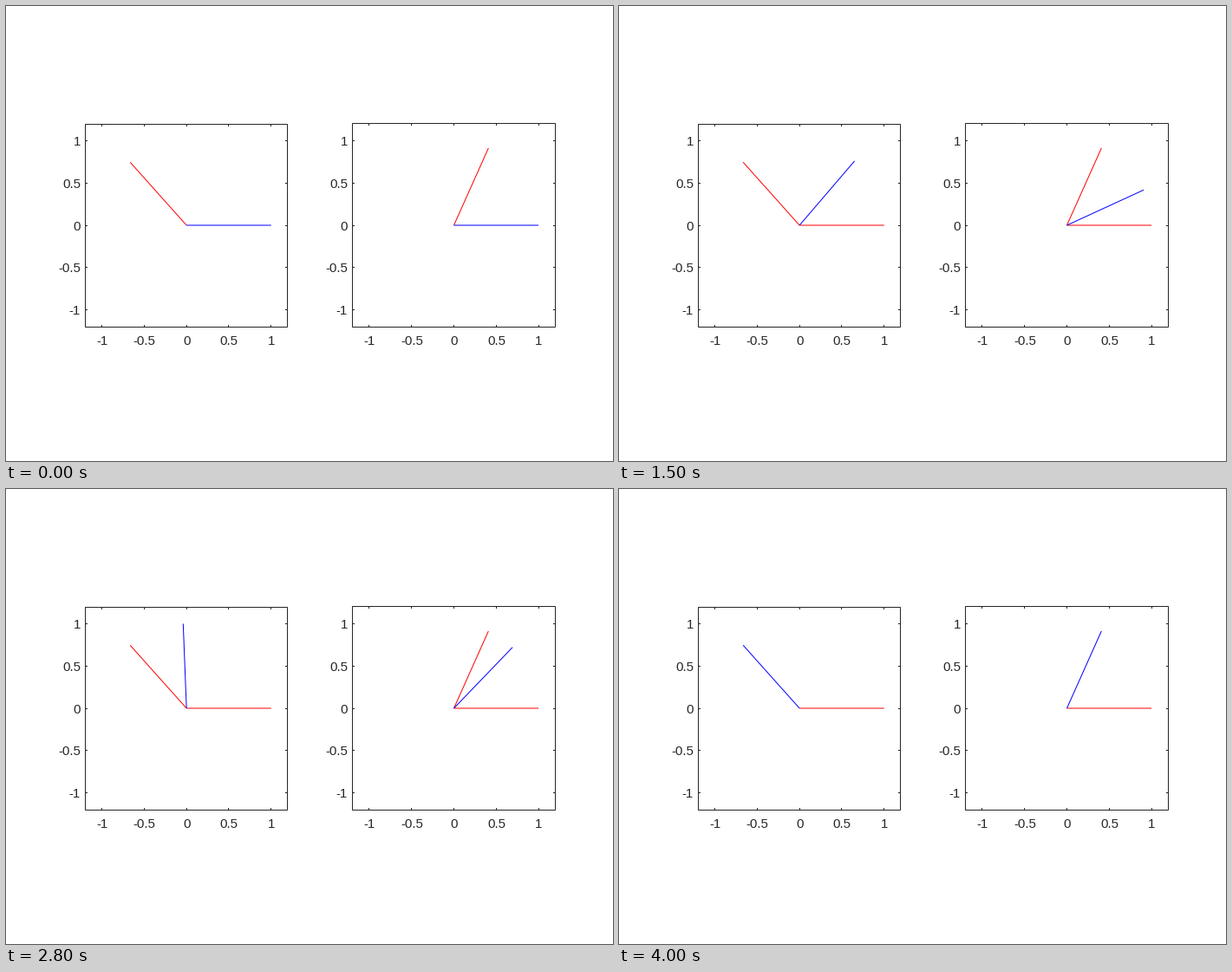
A matplotlib script that plays this animation: 700x525 px, repeating every 4100 ms.

```python
import numpy as np
import matplotlib.pyplot as plt
from matplotlib.animation import FuncAnimation
from matplotlib.patches import Rectangle

W, H, DPI = 700, 525, 100
STEPS = 40
UNIT = 97.6          # pixels per data unit
ORIGIN_Y = 253.0
INK = "#262626"
PX = 72 / DPI        # one pixel in points
TICKS = (-1, -0.5, 0, 0.5, 1)

plt.rcParams["font.family"] = "Liberation Sans"
plt.rcParams["axes.unicode_minus"] = False

fig = plt.figure(figsize=(W / DPI, H / DPI), dpi=DPI, facecolor="white")
ax = fig.add_axes([0, 0, 1, 1])
ax.set_xlim(0, W)
ax.set_ylim(H, 0)
ax.axis("off")


def stroke(xs, ys, color, snap=False):
    line, = ax.plot(xs, ys, color=color, lw=PX, solid_capstyle="butt", snap=snap)
    return line


def label(x, y, value, ha):
    ax.text(x, y, f"{value:g}", ha=ha, va="baseline", size=15 * PX, color=INK)


def pixel(v):
    return np.floor(v) + 0.5


def draw_frame(left, right, top, bottom, ox):
    ax.add_patch(Rectangle((left, top), right - left, bottom - top, fill=False,
                           ec=INK, lw=PX, joinstyle="miter", snap=False))
    for t in TICKS:
        x, y = ox + t * UNIT, ORIGIN_Y - t * UNIT
        px, py = pixel(x), pixel(y)
        for edge, d in ((top, 2.5), (bottom, -2.5)):
            stroke([px, px], [edge, edge + d], INK)
        for edge, d in ((left, 2.5), (right, -2.5)):
            stroke([edge, edge + d], [py, py], INK)
        label(x + 0.4, 391, t, "center")
        label(left - 5.5, y + 5.6, t, "right")


class Panel:
    """A unit vector turning from angle 0 to a goal angle."""

    def __init__(self, box, ox, goal):
        draw_frame(*box, ox)
        self.ox, self.goal = ox, goal
        self.start = stroke(*self.ray(0), "red")
        self.end = stroke(*self.ray(goal), "red")
        self.hand = stroke(*self.ray(0), "blue")

    def ray(self, angle):
        return ([self.ox, self.ox + UNIT * np.cos(angle)],
                [ORIGIN_Y, ORIGIN_Y - UNIT * np.sin(angle)])

    def update(self, i):
        self.hand.set_data(*self.ray(self.goal * i / STEPS))
        # the moving vector replaces the red one it coincides with
        self.start.set_visible(i > 0)
        self.end.set_visible(i < STEPS)


panels = [
    Panel((91.5, 324.5, 136.5, 370.5), 208.15, 2.3),
    Panel((399.5, 633.5, 135.5, 370.5), 516.5, 1.15),
]


def update(i):
    for p in panels:
        p.update(i)
    return [p.hand for p in panels]


anim = FuncAnimation(fig, update, frames=STEPS + 1, interval=100,
                     init_func=lambda: update(0), repeat=True, repeat_delay=0)
plt.show()
```
